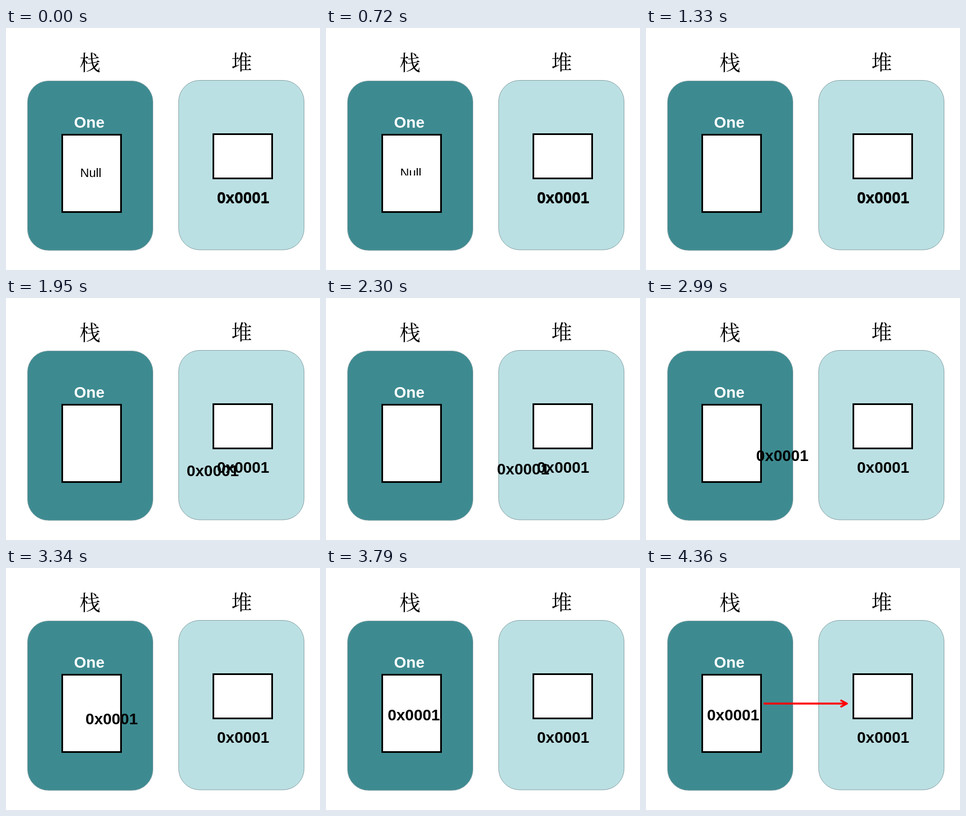
Write an HTML page with a canvas that moves like this. It is 561 px wide and 432 px high and loops after 5440 ms.

```html
<!DOCTYPE html>
<html lang="zh-CN">
<head>
<meta charset="utf-8">
<title>Stack and heap</title>
<style>
  html, body { margin: 0; width: 100%; height: 100%; overflow: hidden; background: #fff; }
  canvas { display: block; width: 561px; height: 432px; }
</style>
</head>
<body>
<canvas id="stage" width="561" height="432"></canvas>
<script>
const ctx = document.getElementById('stage').getContext('2d');
const LOOP = 5440;
const SANS = '"Liberation Sans", Arial, sans-serif';
const TITLE = '37px "Noto Serif CJK SC", "Noto Serif SC", SimSun, "Noto Sans CJK SC", "Noto Sans CJK", serif';
const BOLD = 'bold 28px ' + SANS;

const clamp = v => Math.min(1, Math.max(0, v));
const ease = p => p < 0.5 ? 2 * p * p : 1 - 2 * (1 - p) * (1 - p);

function text(str, x, y, font, color = '#000', align = 'left') {
  ctx.font = font;
  ctx.fillStyle = color;
  ctx.textAlign = align;
  ctx.fillText(str, x, y);
}

function panel(x, y, fill) {
  ctx.beginPath();
  ctx.roundRect(x, y, 224, 302.5, 37.5);
  ctx.fillStyle = fill;
  ctx.fill();
  ctx.strokeStyle = '#86a3a7';
  ctx.lineWidth = 1;
  ctx.stroke();
}

function cell(x, y, w, h) {
  ctx.fillStyle = '#000';
  ctx.fillRect(x, y, w, h);
  ctx.fillStyle = '#fff';
  ctx.fillRect(x + 3, y + 3, w - 6, h - 6);
}

// "Null" is wiped away from the bottom up
function nullLabel(t) {
  if (t >= 1330) return;
  const edge = t < 630 ? 280 : 265 - (t - 630) / 49;
  ctx.save();
  ctx.beginPath();
  ctx.rect(120, 240, 70, edge - 240);
  ctx.clip();
  text('Null', 132.5, 266, '22px ' + SANS);
  ctx.restore();
}

// The address copy jumps to its path, then glides into the stack cell
function addressCopy(t) {
  let dx = 0, dy = 1;
  if (t >= 1897) {
    const u = ease(clamp((t - 1897) / 2000));
    dx = -54 - 214 * u;
    dy = 6.5 - 46.5 * u;
  }
  text('0x0001', 377 + dx, 312 + dy, BOLD);
}

function arrow(t) {
  if (t < 4010) return;
  ctx.save();
  ctx.globalAlpha = t < 4180 ? 0.33 : t < 4360 ? 0.67 : 1;
  ctx.strokeStyle = '#f00';
  ctx.lineWidth = 3.4;
  ctx.lineJoin = 'round';
  ctx.beginPath();
  ctx.moveTo(210, 242);
  ctx.lineTo(359, 242);
  ctx.moveTo(347.5, 236);
  ctx.lineTo(359, 242);
  ctx.lineTo(347.5, 248);
  ctx.stroke();
  ctx.restore();
}

function draw(t) {
  ctx.fillStyle = '#fff';
  ctx.fillRect(0, 0, 561, 432);
  text('栈', 150, 76, TITLE, '#000', 'center');
  text('堆', 421, 75, TITLE, '#000', 'center');
  panel(38.5, 94.5, '#3d8b91');
  panel(308.5, 93.5, '#bbe0e3');
  cell(99, 189, 108, 141);
  cell(369, 188, 108, 82);
  text('One', 121.5, 178, BOLD, '#fff');
  text('0x0001', 377, 312, BOLD);
  nullLabel(t);
  addressCopy(t);
  arrow(t);
}

const start = performance.now();
function tick() {
  draw((performance.now() - start) % LOOP);
  requestAnimationFrame(tick);
}
tick();
</script>
</body>
</html>
```
